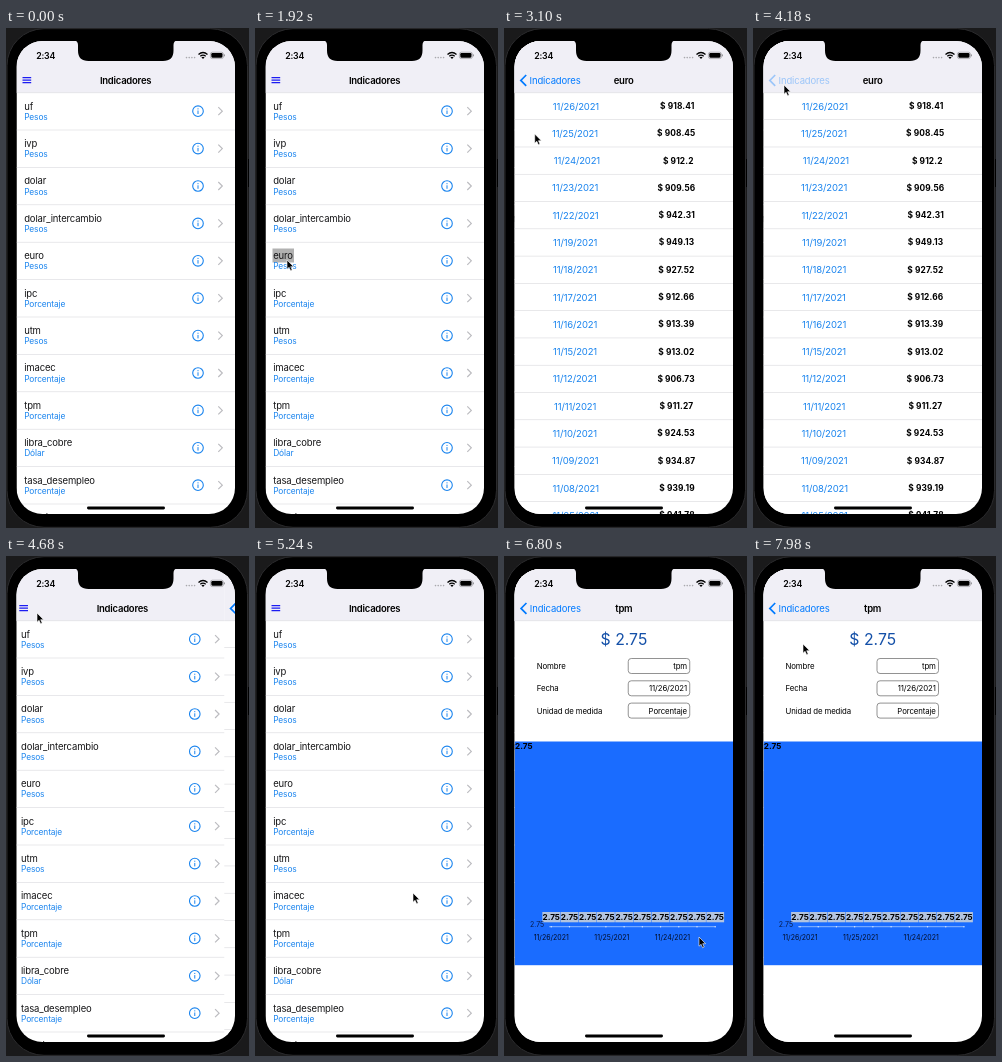
Recreate the animation shown at these times as an HTML page. Size 243 px wide and 500 px high, loop 8 s.

```html
<!DOCTYPE html>
<html lang="es">
<head>
<meta charset="utf-8">
<title>Indicadores</title>
<style>
  html, body { margin: 0; width: 100%; height: 100%; overflow: hidden; background: #000; }
  svg { display: block; width: 100vw; height: 100vh; }
  text { font-family: Inter, Roboto, sans-serif; white-space: pre; }
</style>
</head>
<body>
<svg id="stage" viewBox="0 0 243 500" xmlns="http://www.w3.org/2000/svg">
  <defs>
    <clipPath id="screen"><rect x="10.5" y="13" width="218.500" height="473" rx="26"/></clipPath>
  </defs>
  <rect width="243" height="500" fill="#1a1a1b"/>
  <rect x="241.500" y="131" width="1.500" height="28"/>
  <rect x="1" y=".7" width="240.500" height="498.600" rx="37" fill="#000" stroke="#2b2b2d"/>
  <g clip-path="url(#screen)">
    <g id="list"></g>
    <g id="euro"></g>
    <g id="tpm"></g>
    <g id="status"></g>
    <rect x="81" y="478.600" width="78" height="2.800" rx="1.400"/>
  </g>
  <path d="M68 12H171.500Q167.500 13 167.500 17V22.500Q167.500 33 157 33H82.500Q72 33 72 22.500V17Q72 13 68 12Z"/>
  <path id="cursor" d="M0 0V9.200L2.100 7.300L3.600 10.700L5.200 10L3.700 6.700H6.600Z" stroke="#fff" stroke-width=".6"/>
</svg>
<script>
const LOOP = 8000, WIDTH = 218.5, LEFT = 10.5;
const BLUE = '#007aff', LINK = '#1a84ee', INK = '#161618';
const $ = id => document.getElementById(id);

function add(parent, tag, attrs, content) {
  const el = document.createElementNS('http://www.w3.org/2000/svg', tag);
  for (const key in attrs) el.setAttribute(key, attrs[key]);
  if (content !== undefined) el.textContent = content;
  parent.appendChild(el);
  return el;
}
const rect = (g, x, y, width, height, fill, more) =>
  add(g, 'rect', { x, y, width, height, fill, ...more });
const line = (g, d, stroke, width, more) =>
  add(g, 'path', { d, stroke, 'stroke-width': width, fill: 'none', ...more });
const text = (g, content, x, y, size, more) =>
  add(g, 'text', { x, y, 'font-size': size, ...more }, content);
const divider = (g, y) => rect(g, LEFT, y, WIDTH, 0.6, '#d9d9dd');

const body = { 'letter-spacing': -0.15 };
const small = { 'letter-spacing': -0.1 };
const semi = { 'letter-spacing': -0.24, 'font-weight': 600, 'text-anchor': 'middle' };

function header(g, title) {
  rect(g, LEFT, 13, WIDTH, 473, '#fff');
  rect(g, LEFT, 13, WIDTH, 51.6, '#f0eff6');
  divider(g, 64.5);
  text(g, title, 119.6, 55.8, 9.5, semi);
}

function backButton(g) {
  const back = add(g, 'g', {});
  line(back, 'M22.200 47L16.800 52.400L22.200 57.800', BLUE, 1.7);
  text(back, 'Indicadores', 25.6, 55.8, 9.5, { ...body, fill: BLUE });
  return back;
}

function buildList(g) {
  const P = 'Pesos', C = 'Porcentaje';
  const rows = [['uf', P], ['ivp', P], ['dolar', P], ['dolar_intercambio', P], ['euro', P],
    ['ipc', C], ['utm', P], ['imacec', C], ['tpm', C], ['libra_cobre', 'Dólar'],
    ['tasa_desempleo', C], ['bitcoin', 'Dólar']];
  header(g, 'Indicadores');
  line(g, 'M16.500 49.600H25.200M16.500 52.100H25.200M16.500 54.600H25.200', '#1c1cf2', 1.1);
  const press = rect(g, 17.5, 220.5, 21.5, 14, '#b1b1b1');
  rows.forEach(([name, unit], i) => {
    const row = add(g, 'g', { transform: `translate(0 ${37.4 * i})` });
    text(row, name, 18.2, 81.6, 9.5, { ...body, fill: INK });
    text(row, unit, 18.2, 91.8, 8.4, { 'letter-spacing': -0.13, fill: LINK });
    add(row, 'circle', { cx: 192, cy: 83.2, r: 5.3, fill: 'none', stroke: LINK, 'stroke-width': 1.1 });
    line(row, 'M192 80.300V81.400M192 82.500V86', LINK, 1);
    line(row, 'M212.300 79.200L216.300 83.200L212.300 87.200', '#bcbcc0', 1.2);
    divider(row, 101.7);
  });
  return press;
}

function buildEuro(g) {
  const days = [26, 25, 24, 23, 22, 19, 18, 17, 16, 15, 12, 11, 10, 9, 8, 5];
  const values = [918.41, 908.45, 912.2, 909.56, 942.31, 949.13, 927.52, 912.66,
    913.39, 913.02, 906.73, 911.27, 924.53, 934.87, 939.19, 941.78];
  header(g, 'euro');
  days.forEach((day, i) => {
    const y = 81.6 + 27.28 * i;
    const date = text(g, `11/${String(day).padStart(2, '0')}/2021`, 0, y, 9.5,
      { ...body, fill: LINK, 'text-anchor': 'middle' });
    const value = text(g, `$ ${values[i]}`, 0, y - 0.6, 8.4,
      { 'font-weight': 700, 'text-anchor': 'middle', 'letter-spacing': 0.1 });
    // Free space is shared evenly around the two cells.
    const shift = (date.getComputedTextLength() - value.getComputedTextLength()) / 4;
    date.setAttribute('x', 69 + shift);
    value.setAttribute('x', 170.3 + shift);
    divider(g, y + 9.8);
  });
  return backButton(g);
}

function buildTpm(g) {
  header(g, 'tpm');
  backButton(g);
  text(g, '$ 2.75', 119.7, 89.2, 15.8, { 'text-anchor': 'middle', fill: '#1450a8' });
  [['Nombre', 'tpm'], ['Fecha', '11/26/2021'], ['Unidad de medida', 'Porcentaje']].forEach(([label, value], i) => {
    const y = 102.5 + 22.3 * i;
    text(g, label, 32.5, y + 10.4, 7.8, small);
    rect(g, 124, y, 61.5, 15, '#fff', { rx: 3, stroke: '#777', 'stroke-width': 0.8 });
    text(g, value, 182.8, y + 10.5, 7.8, { ...small, 'text-anchor': 'end' });
  });
  rect(g, LEFT, 185.5, WIDTH, 223.7, '#1a6cff');
  const bold = { 'font-weight': 700 };
  text(g, '2.75', 10.8, 193.3, 8.2, bold);
  line(g, 'M45 370.700H211', '#a9caff', 0.8);
  for (let i = 0; i < 10; i++) {
    const x = 47 + 18.22 * i;
    rect(g, x - 8.9, 356, 17.8, 10.3, '#b3c4df');
    text(g, '2.75', x, 364, 8.2, { ...bold, 'text-anchor': 'middle' });
    add(g, 'circle', { cx: x, cy: 370.7, r: 0.7, fill: '#d5e5ff' });
  }
  text(g, '2.75', 25.8, 370.6, 7, { fill: '#071c4d' });
  [26, 25, 24].forEach((day, i) =>
    text(g, `11/${day}/2021`, 47 + 60.6 * i, 383.8, 7, { 'text-anchor': 'middle', fill: '#030d26' }));
}

function buildStatus(g) {
  text(g, '2:34', 30.2, 30.9, 8.8, { 'font-weight': 600, 'letter-spacing': -0.2 });
  for (let i = 0; i < 4; i++) add(g, 'circle', { cx: 180.5 + 2.7 * i, cy: 29.6, r: 0.8, fill: '#a8a8ad' });
  line(g, 'M192.500 26.600Q197 22.500 201.500 26.600M194.300 28.300Q197 26 199.700 28.300', '#000', 1.3);
  add(g, 'path', { d: 'M195.400 29.300Q197 28.200 198.600 29.300L197 31Z' });
  rect(g, 204.4, 24.2, 13, 6.4, 'none', { rx: 1.9, stroke: '#8c8c90', 'stroke-width': 0.6 });
  rect(g, 205.3, 25.1, 11.2, 4.6, '#000', { rx: 1.1 });
  rect(g, 218.1, 26.3, 0.9, 2.2, '#8c8c90', { rx: 0.4 });
}

const press = buildList($('list'));
const back = buildEuro($('euro'));
buildTpm($('tpm'));
buildStatus($('status'));

// Critically damped spring: 1 at the start, settling to 0.
function spring(ms) {
  if (ms <= 0) return 1;
  if (ms >= 560) return 0;
  const k = 18.26 * ms / 1000;
  return (1 + k) * Math.exp(-k);
}

// Pointer stops: time, x, y.
const path = [
  [320, 1, 428], [1120, 27, 290], [1540, 32, 232], [2960, 32, 232], [3200, 30, 32],
  [3460, 30, 32], [3640, 22, 46], [3860, 31, 57], [4700, 31, 57], [5240, 158, 337],
  [6040, 195, 381], [6900, 195, 381], [7240, 236, 332], [7920, 50.5, 89], [7980, 50, 88], [8000, 50, 88]
];

function pointer(t) {
  const i = path.findIndex(stop => stop[0] > t);
  const [t0, x0, y0] = path[i - 1], [t1, x1, y1] = path[i];
  const u = (t - t0) / (t1 - t0), e = u * u * (3 - 2 * u);
  return [x0 + (x1 - x0) * e, y0 + (y1 - y0) * e];
}

const show = (el, on) => el.setAttribute('display', on ? 'inline' : 'none');
const slide = (el, x) => el.setAttribute('transform', `translate(${x.toFixed(2)} 0)`);

function draw(t) {
  const euroOut = t < 4420 ? spring(t - 2220) : 1 - spring(t - 4420);
  const tpmOut = spring(t - 6300);
  slide($('list'), -0.3 * WIDTH * (1 - Math.min(euroOut, tpmOut)));
  slide($('euro'), WIDTH * euroOut);
  slide($('tpm'), WIDTH * tpmOut);
  show($('euro'), euroOut < 1);
  show($('tpm'), tpmOut < 1);
  show(press, t >= 1920 && t < 2220);
  back.setAttribute('opacity', t >= 4180 && t < 4420 ? 0.35 : 1);
  show($('cursor'), t >= 320);
  if (t >= 320) $('cursor').setAttribute('transform', `translate(${pointer(t)})`);
}

function tick() {
  draw(performance.now() % LOOP);
  requestAnimationFrame(tick);
}
tick();
</script>
</body>
</html>
```
